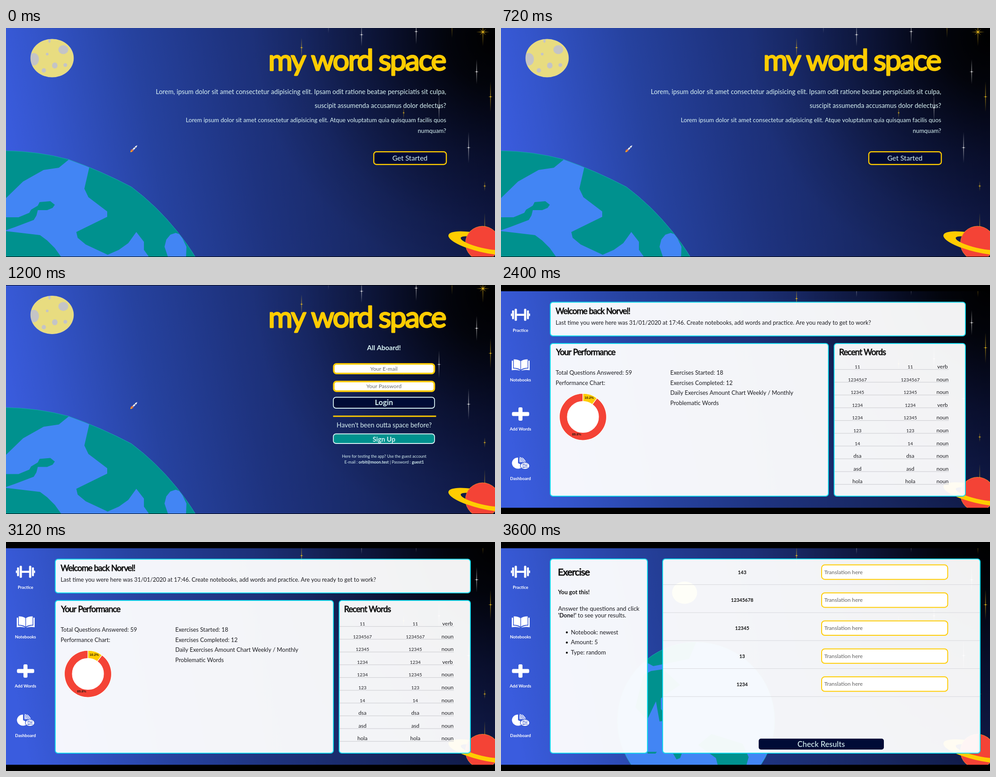
Write an HTML page with a canvas that moves like this. It is 1092 px wide and 513 px high and loops after 4800 ms.

```html
<!DOCTYPE html>
<html lang="en">
<head>
<meta charset="utf-8">
<title>my word space</title>
<style>
  html, body { margin: 0; width: 100%; height: 100%; overflow: hidden; background: #000; }
  canvas { display: block; }
</style>
</head>
<body>
<canvas id="stage" width="1092" height="513"></canvas>
<script>
const W = 1092, H = 513, HOLD = 1200;
const ctx = document.getElementById('stage').getContext('2d');
const YELLOW = '#ffcc00', TEAL = '#00918e', BLUE = '#4285f4', NAVY = '#000b36';
const PALE = '#d9f3f4', INK = '#1d1d22', CYAN = '#14dbee', RED = '#f44336';
const FONT = 'Lato, sans-serif';

// --- helpers ---
function text(str, x, y, size, color, align = 'left', weight = 400) {
  ctx.font = `${weight} ${size}px ${FONT}`;
  ctx.fillStyle = color;
  ctx.textAlign = align;
  ctx.fillText(str, x, y);
}

// Tight display type; the round outline softens the stroke ends.
function heading(str, x, y, size, color, align = 'left') {
  ctx.save();
  ctx.letterSpacing = -.045 * size + 'px';
  ctx.strokeStyle = color;
  ctx.lineWidth = .045 * size;
  ctx.lineJoin = 'round';
  text(str, x, y, size, color, align);
  ctx.strokeText(str, x, y);
  ctx.restore();
}

// Mixed-weight line; pieces alternate regular and bold.
function richText(pieces, x, y, size, color, centered) {
  const weight = i => (i % 2 ? 700 : 400);
  const widths = pieces.map((p, i) => {
    ctx.font = `${weight(i)} ${size}px ${FONT}`;
    return ctx.measureText(p).width;
  });
  if (centered) x -= widths.reduce((a, b) => a + b) / 2;
  pieces.forEach((p, i) => {
    text(p, x, y, size, color, 'left', weight(i));
    x += widths[i];
  });
}

function box(x0, y0, x1, y1, r, fill, stroke, line) {
  ctx.beginPath();
  ctx.roundRect(x0, y0, x1 - x0, y1 - y0, r);
  if (fill) { ctx.fillStyle = fill; ctx.fill(); }
  if (stroke) { ctx.strokeStyle = stroke; ctx.lineWidth = line; ctx.stroke(); }
}

function oval(x, y, rx, ry, fill, tilt = 0) {
  ctx.beginPath();
  ctx.ellipse(x, y, rx, ry, tilt, 0, 7);
  ctx.fillStyle = fill;
  ctx.fill();
}

function poly(fill, ...p) {
  ctx.beginPath();
  for (let i = 0; i < p.length; i += 2) ctx.lineTo(p[i], p[i + 1]);
  ctx.closePath();
  ctx.fillStyle = fill;
  ctx.fill();
}

function rule(x0, x1, y, color, line) {
  ctx.fillStyle = color;
  ctx.fillRect(x0, y - line / 2, x1 - x0, line);
}

const panel = (x0, y0, x1, y1) => box(x0, y0, x1, y1, 6, 'rgba(255,255,255,.95)', CYAN, 2);

// --- sky ---
function sky() {
  let g = ctx.createLinearGradient(0, 256, 1050, 56);
  g.addColorStop(0, '#3a5cde');
  g.addColorStop(.1, '#3455cb');
  g.addColorStop(.3, '#26429f');
  g.addColorStop(.5, '#1e337f');
  g.addColorStop(.75, '#17265f');
  g.addColorStop(1, '#0f1844');
  ctx.fillStyle = g;
  ctx.fillRect(0, -20, W, H + 40);
  g = ctx.createRadialGradient(1092, 20, 0, 1092, 20, 540);
  g.addColorStop(0, 'rgba(0,0,0,1)');
  g.addColorStop(.2, 'rgba(0,0,0,.84)');
  g.addColorStop(.5, 'rgba(0,0,8,.42)');
  g.addColorStop(.8, 'rgba(0,0,16,.11)');
  g.addColorStop(1, 'rgba(0,0,16,0)');
  ctx.fillStyle = g;
  ctx.fillRect(0, -20, W, H + 40);
}

function star(x, y, len, arm, color, alpha = .8) {
  ctx.globalAlpha = alpha;
  poly(color, x, y - len, x + .6, y, x, y + len, x - .6, y);
  poly(color, x - arm, y, x, y - .7, x + arm, y, x, y + .7);
  oval(x, y, 1.3, 1.3, color);
  ctx.globalAlpha = 1;
}

function stars() {
  const white = '#f2f2f2', gold = '#f0c020';
  star(794, 15, 26, 5, white);
  star(916, 8, 29, 5, white);
  star(1051, 98, 28, 5, white);
  star(967, 179, 31, 5, white, .7);
  star(1033, 268, 35, 5, white);
  star(720, -6, 18, 4, white, .4);
  star(996, -6, 29, 4, gold, .65);
  star(660, 44, 22, 4, gold);
  star(1082, 154, 34, 5, gold);
  star(888, 190, 14, 3, gold, .6);
  star(1069, 354, 11, 4, gold, .65);
  star(1069, 445, 31, 4, gold, .65);
  star(1065, 9, 32, 15, gold, .9);
  for (const s of [-1, 1])
    poly(gold, 1058, 9 - 7 * s, 1065.5, 9 - s / 2, 1072, 9 + 7 * s, 1064.5, 9 + s / 2);
}

function saturn() {
  const x = 1064, y = 482, tilt = .235;
  const ring = () => {
    ctx.beginPath();
    ctx.ellipse(x, y, 78, 20, tilt, 0, 7);
    ctx.ellipse(x, y, 50, 10.5, tilt, 0, 7);
    ctx.fillStyle = YELLOW;
    ctx.fill('evenodd');
  };
  ring();
  oval(x, y, 38.5, 38.5, '#f0872e');
  oval(x, y, 37.6, 37.6, RED);
  ctx.save();
  ctx.translate(x, y);
  ctx.rotate(tilt);
  ctx.beginPath();
  ctx.rect(-90, 0, 180, 40);
  ctx.rotate(-tilt);
  ctx.translate(-x, -y);
  ctx.clip();
  ring();
  ctx.restore();
}

function space(shift) {
  ctx.save();
  ctx.translate(0, shift);
  sky();
  stars();
  saturn();
  ctx.restore();
}

// --- bodies ---
function moon() {
  const grey = '#c4c4c6';
  ctx.save();
  oval(103, 67.5, 48.3, 43, '#d8d3a2');
  ctx.beginPath();
  ctx.ellipse(103, 67.5, 47.7, 42.4, 0, 0, 7);
  ctx.fillStyle = '#e8dc80';
  ctx.fill();
  ctx.clip();
  oval(128, 48.5, 11, 10, grey);
  oval(97, 28, 2.6, 5, grey);
  oval(62, 70, 11.5, 14, grey);
  oval(92, 58.5, 3, 3, grey);
  oval(109, 84, 6.2, 6.8, grey);
  oval(132.5, 83, 4.3, 4.2, grey);
  oval(84.5, 95, 4.8, 5, grey);
  ctx.restore();
}

function globe(outline, land) {
  ctx.fillStyle = BLUE;
  ctx.fill(outline);
  ctx.save();
  ctx.clip(outline);
  land();
  ctx.restore();
  ctx.strokeStyle = '#18a3ae';
  ctx.lineWidth = 1;
  ctx.stroke(outline);
}

const nearGlobe = new Path2D(
  'M-2 275Q72 276 140 294.5Q212 320 280 356Q336 398 381 454Q406 485 424 515H-2Z');
const farGlobe = new Path2D();
farGlobe.arc(435.5, 400, 175.5, 0, 7);

function nearLand() {
  poly(TEAL, 0, 260, 150, 260, 140, 295, 118, 313, 84, 318, 38, 344, 0, 381);
  poly(TEAL, 186, 312, 190, 290, 440, 400, 440, 520, 321, 520, 318, 511, 308, 497, 308, 479,
    291, 457, 273, 482, 252, 497, 227, 508, 178, 485, 160, 470, 157, 457, 226, 423, 226, 411,
    184, 379, 175, 360);
  poly(BLUE, 354, 490, 358, 474, 367, 463, 379, 459, 390, 463, 403, 490, 402, 514, 362, 514);
  poly(TEAL, 0, 455, 76, 464, 92, 476, 109, 493, 124, 514, 0, 514);
  poly(TEAL, 0, 424, 28, 424, 52, 414, 56, 407, 71, 398, 75, 390, 99, 388, 109, 396, 104, 403,
    92, 408, 71, 408, 68, 420, 62, 430, 20, 446, 0, 453);
}

function farLand() {
  poly(TEAL, 310, 262, 361, 225, 440, 215, 420, 262, 361, 274, 340, 278);
  poly(TEAL, 318, 298, 335, 289, 362, 285, 400, 320, 357, 350, 357, 374, 362, 380, 362, 401,
    354, 402, 346, 357, 326, 399, 300, 370);
  poly(TEAL, 382, 470, 405, 470, 400, 484, 392, 487);
  poly(TEAL, 326, 470, 348, 470, 345, 474, 328, 474);
  poly(TEAL, 440, 455, 470, 430, 540, 452, 553, 482, 548, 500, 484, 500, 480, 484);
}

function rocket() {
  ctx.save();
  ctx.translate(285.5, 270.5);
  ctx.rotate(Math.PI / 4);
  poly('#f5a623', -2, 5, 2, 5, 1.6, 9, 0, 11, -1.6, 9);
  poly('#d9573a', -3.4, 7, -1.6, 2, 1.6, 2, 3.4, 7, 0, 6);
  poly('#f4f4f6', 0, -11, 1.6, -7, 1.6, 4, -1.6, 4, -1.6, -7);
  rule(-1.6, 1.6, -4, '#46506e', 1);
  rule(-1.6, 1.6, 2.5, '#46506e', 1);
  ctx.restore();
}

// --- sidebar ---
function dumbbell() {
  box(31, 64.5, 56, 69, 1, '#fff');
  for (const s of [-1, 1]) {
    const bar = (a, b, h) =>
      box(43.5 + Math.min(s * a, s * b), 66.8 - h, 43.5 + Math.max(s * a, s * b), 66.8 + h, 1.8, '#fff');
    bar(8, 13, 13.5);
    bar(14.5, 18.8, 10);
    bar(19, 21.5, 3);
  }
}

function book() {
  for (const s of [-1, 1]) {
    ctx.save();
    ctx.translate(44, 179);
    ctx.scale(s, 1);
    ctx.fillStyle = '#fff';
    ctx.beginPath();
    ctx.moveTo(.7, -8.5);
    ctx.quadraticCurveTo(6, -12.5, 15.5, -12.5);
    ctx.lineTo(15.5, 6.5);
    ctx.quadraticCurveTo(6, 6.5, .7, 10.5);
    ctx.fill();
    ctx.beginPath();
    ctx.moveTo(17, -9.5);
    ctx.lineTo(20, -9.5);
    ctx.lineTo(20, 12);
    ctx.quadraticCurveTo(10, 10, .7, 13);
    ctx.quadraticCurveTo(7, 8, 17, 8.3);
    ctx.fill();
    ctx.restore();
  }
}

function charts() {
  ctx.fillStyle = '#fff';
  ctx.beginPath();
  ctx.moveTo(38, 399);
  ctx.ellipse(38, 399, 13.5, 12.5, 0, .5, Math.PI * 1.5);
  ctx.fill();
  ctx.strokeStyle = '#fff';
  ctx.lineWidth = 1.8;
  ctx.save();
  ctx.beginPath();
  ctx.moveTo(41, 397);
  ctx.ellipse(41, 397, 14, 11.5, 0, -Math.PI / 2, 0);
  ctx.closePath();
  ctx.clip();
  ctx.beginPath();
  for (let i = 0; i < 6; i++) {
    ctx.moveTo(36 + i * 4, 383);
    ctx.lineTo(50 + i * 4, 399);
    ctx.moveTo(36, 383 + i * 4);
    ctx.lineTo(50, 399 + i * 4);
  }
  ctx.stroke();
  ctx.restore();
  oval(53.5, 405, 11, 8, '#3557cc');
  oval(53.5, 405, 9.7, 7, '#fff');
  for (let i = 0; i < 3; i++) {
    rule(47, 60, 401.5 + i * 3.5, '#3557cc', .9);
    oval(51 + (i % 2) * 5, 401.5 + i * 3.5, 1.3, 1.3, '#3557cc');
  }
}

function sidebar() {
  dumbbell();
  book();
  box(24.5, 284.5, 63, 293.5, 3, '#fff');
  box(39, 274, 48, 304, 3, '#fff');
  charts();
  ['Practice', 'Notebooks', 'Add Words', 'Dashboard'].forEach((name, i) =>
    text(name, 43.5, 105 + i * 110.7, 9.6, '#fff', 'center', 700));
}

// --- scenes ---
function bars(top, bottom) {
  ctx.fillStyle = '#000';
  ctx.fillRect(0, 0, W, top);
  ctx.fillRect(0, H - bottom, W, bottom);
}

function landing(shift) {
  space(shift);
  ctx.save();
  ctx.translate(0, shift / 2);
  moon();
  globe(nearGlobe, nearLand);
  rocket();
  heading('my word space', 981, 95, 66, YELLOW, 'right');
  ctx.restore();
}

function intro() {
  landing(0);
  const line = (str, y, size) => text(str, 983, y, size, PALE, 'right');
  line('Lorem, ipsum dolor sit amet consectetur adipisicing elit. Ipsam odit ratione beatae perspiciatis sit culpa,', 148, 14.43);
  line('suscipit assumenda accusamus dolor delectus?', 179, 14.43);
  line('Lorem ipsum dolor sit amet consectetur adipisicing elit. Atque voluptatum quia quisquam facilis quos', 211, 13.25);
  line('numquam?', 234.5, 13.25);
  box(821.3, 277.3, 983.3, 305.7, 6, NAVY, YELLOW, 2.4);
  text('Get Started', 902, 297, 15.6, PALE, 'center');
  bars(0, 1);
}

function login() {
  landing(-1);
  const mid = 844;
  text('All Aboard!', mid, 146, 15.2, PALE, 'center', 700);
  ['Your E-mail', 'Your Password'].forEach((hint, i) => {
    const y = 176.7 + i * 39.6;
    box(732, y, 956.5, y + 21.6, 6, '#fff', YELLOW, 3.6);
    text(hint, mid, y + 15, 12.1, '#757575', 'center', 500);
  });
  box(731, 251.5, 957, 276, 6, NAVY, PALE, 1.8);
  text('Login', mid, 269, 16.8, PALE, 'center', 700);
  rule(730.5, 960.5, 294, YELLOW, 3);
  text("Haven't been outta space before?", mid + .5, 319, 14.5, PALE, 'center');
  box(731, 333.5, 957, 355, 6, TEAL, PALE, 1.8);
  text('Sign Up', mid, 350.5, 14.8, PALE, 'center', 700);
  text('Here for testing the app? Use the guest account', mid + .5, 386.5, 9, PALE, 'center');
  richText(['E-mail : ', 'orbit@moon.test', ' | Password : ', 'guest1'], mid + .5, 399.5, 9, PALE, true);
  bars(1, 1);
}

function donut(x, y, share) {
  const top = -Math.PI / 2, cut = top + share * 2 * Math.PI;
  const slice = (a, b, color) => {
    ctx.beginPath();
    ctx.arc(x, y, 52.5, a, b);
    ctx.arc(x, y, 35, b, a, true);
    ctx.closePath();
    ctx.fillStyle = color;
    ctx.fill();
    ctx.strokeStyle = '#fff';
    ctx.lineWidth = 1.2;
    ctx.stroke();
  };
  oval(x, y, 35, 35, '#fff');
  slice(cut, top + 2 * Math.PI, RED);
  slice(top, cut, YELLOW);
  ctx.font = '700 7.2px "Liberation Sans", Arial, sans-serif';
  ctx.fillStyle = '#2a1a10';
  ctx.textAlign = 'center';
  ctx.fillText('10.2%', x + 14, y - 41);
  ctx.fillText('89.8%', x - 14, y + 41.5);
}

function dashboard() {
  space(-13.5);
  sidebar();
  panel(110, 38.5, 1037, 114);
  panel(110, 131, 731, 473);
  panel(744, 131, 1037, 473);
  heading('Welcome back Norvel!', 122, 65, 18.5, '#111');
  text('Last time you were here was 31/01/2020 at 17:46. Create notebooks, add words and practice. Are you ready to get to work?', 122, 89, 12.87, INK);
  heading('Your Performance', 123, 157, 18.5, '#111');
  text('Total Questions Answered: 59', 122, 201, 12.95, INK);
  text('Performance Chart:', 122, 223.5, 12.95, INK);
  ['Exercises Started: 18', 'Exercises Completed: 12', 'Daily Exercises Amount Chart Weekly / Monthly', 'Problematic Words']
    .forEach((str, i) => text(str, 378, 201 + i * 22.7, 12.95, INK));
  donut(183, 295.5, .102);
  heading('Recent Words', 755, 157, 18.5, '#111');
  const words = ['11', '1234567', '12345', '1234', '1234', '123', '14', 'dsa', 'asd', 'hola'];
  words.forEach((word, i) => {
    const y = 187 + i * 28.6, size = i < 7 ? 10.3 : 12;
    text(word, 796, y, size, INK, 'center');
    text(i === 4 ? '12345' : word, 914, y, size, INK, 'center');
    text(i % 3 || i > 3 ? 'noun' : 'verb', 986, y, 12, INK, 'center');
    rule(745, 1000, y + 2.2, '#c9cacf', 1);
  });
  bars(14, 14);
}

function exercise() {
  space(-13.5);
  oval(410, 113.5, 28, 25, '#f5e878');
  globe(farGlobe, farLand);
  sidebar();
  panel(110, 38, 327, 473);
  panel(361, 38, 1070, 473);
  heading('Exercise', 127, 75, 21.8, '#111');
  text('You got this!', 127.5, 117, 12.8, '#111', 'left', 700);
  text('Answer the questions and click', 127.5, 154, 13.35, INK);
  richText(['', "'Done!'", ' to see your results.'], 127.5, 169, 13, INK);
  ['Notebook: newest', 'Amount: 5', 'Type: random'].forEach((str, i) => {
    const y = 206.5 + i * 22.7;
    oval(147, y - 4, 2.2, 2.2, '#111');
    text(str, 156, y, 13.1, INK);
  });
  ['143', '12345678', '12345', '13', '1234'].forEach((word, i) => {
    const y = 67.5 + i * 62.7;
    text(word, 538.5, y + 4.2, 10.8, '#111', 'center', 700);
    box(716, y - 16.2, 997.5, y + 16.2, 7, '#fff', YELLOW, 2);
    text('Translation here', 722, y + 4, 12.2, '#6c6c6c', 'left', 500);
    rule(362, 1069, y + 28, '#d6d7dc', 1);
  });
  box(575.5, 440.5, 855, 465, 5, NAVY);
  text('Check Results', 715, 459, 17.2, PALE, 'center', 500);
  bars(14, 14);
}

const scenes = [intro, login, dashboard, exercise];
const start = performance.now();

function draw() {
  const t = performance.now() - start;
  ctx.clearRect(0, 0, W, H);
  scenes[Math.floor(t / HOLD) % scenes.length]();
  requestAnimationFrame(draw);
}
draw();
</script>
</body>
</html>
```
